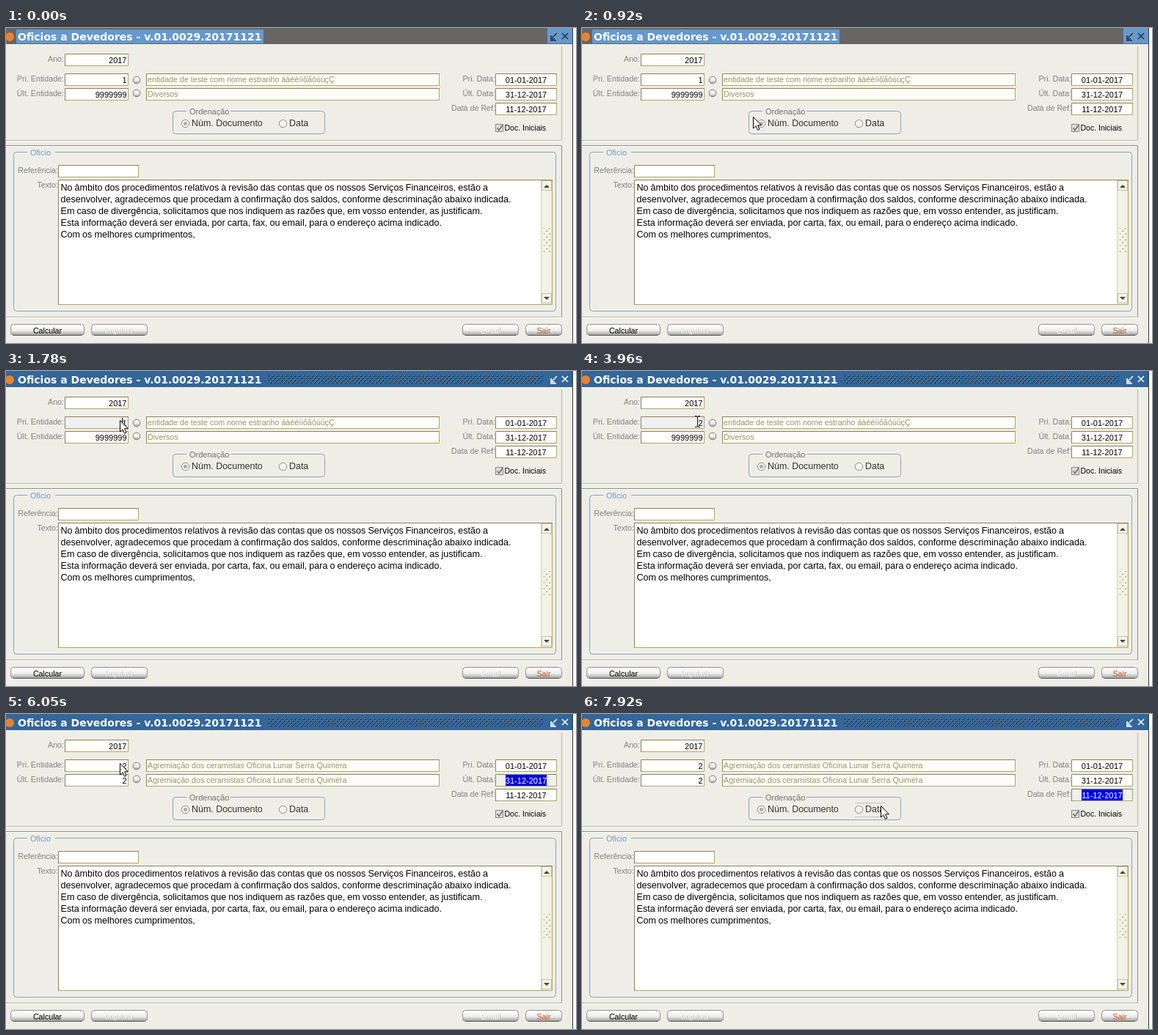
An HTML page for the animation above (8000 ms loop, 777x430 px).

```html
<!DOCTYPE html>
<html lang="pt">
<head>
<meta charset="utf-8">
<style>
html, body { margin: 0; width: 100%; height: 100%; overflow: hidden; background: #efeee6; }
svg { display: block; width: 777px; height: 430px; }
text { font-family: "Liberation Sans", Arial, sans-serif; font-size: 10.7px; white-space: pre; }
.title { font: bold 14px "DejaVu Sans", Verdana, sans-serif; fill: #fff; }
.label { fill: #808080; text-anchor: end; }
.num { font-size: 11px; text-anchor: end; }
.date { font-size: 11px; text-anchor: middle; }
.name { fill: #9a9660; }
.body { font-size: 12.6px; word-spacing: -.5px; }
.option { font-size: 12.45px; fill: #333; }
.button { text-anchor: middle; }
</style>
</head>
<body>
<svg id="stage" viewBox="0 0 777 430" xmlns="http://www.w3.org/2000/svg"></svg>
<script>
const LOOP = 8000;
const stage = document.getElementById('stage');

const rect = (x, y, w, h, fill, extra = '') =>
  `<rect x="${x}" y="${y}" width="${w}" height="${h}" fill="${fill}" ${extra}/>`;
const path = (d, stroke, extra = '') => `<path d="${d}" fill="none" stroke="${stroke}" ${extra}/>`;
const text = (x, y, cls, value, extra = '') => `<text x="${x}" y="${y}" class="${cls}" ${extra}>${value}</text>`;
const circle = (x, y, r, fill, extra = '') => `<circle cx="${x}" cy="${y}" r="${r}" fill="${fill}" ${extra}/>`;

// Sunken box: dark top and left edges, olive bottom and right edges
const box = (id, x, y, w, h, fill = '#fff') =>
  rect(x, y, w, h, fill, `id="${id}"`) +
  path(`M${x + .5} ${y + h}V${y + .5}H${x + w}`, '#85845c') +
  path(`M${x + 1} ${y + h - .5}H${x + w - .5}V${y + 1}`, '#a9a869');

const group = (x, y, w, h, label, labelX, gap, color) =>
  rect(x + .5, y + .5, w, h, 'none', 'rx="4" stroke="#8aa4bd"') +
  rect(labelX - 4, y - 1, gap, 3, '#efeee6') +
  text(labelX, y + 5, '', label, `fill="${color}" style="font-size:11px"`);

const button = (x, w, label, color, disabled) => {
  const mid = x + w / 2;
  return rect(x + .5, 404.5, w - 1, 15, 'url(#gloss)', 'rx="4" stroke="#8f8f8f"') +
    path(`M${x + 4} 419.5H${x + w - 4}`, '#555') +
    (disabled ? text(mid + .6, 417.4, 'button', label, 'fill="#aaa"') : '') +
    text(mid, 416.5, 'button', label, `fill="${color}"`);
};

const radio = (x, y) => circle(x, y, 5.2, '#f4f4ee', 'stroke="#8b8b8b"');
const knob = y => circle(178, y, 4.8, 'url(#gloss)', 'stroke="#777"');
const bumps = (id, size, dark, light) =>
  `<pattern id="${id}" width="${size}" height="${size}" patternUnits="userSpaceOnUse">` +
  [0, size / 2].map(p => rect(p, size / 2 - p, 2, 2, dark) + rect(p, size / 2 - p, 1, 1, light)).join('') + '</pattern>';

const letter = [
  'No âmbito dos procedimentos relativos à revisão das contas que os nossos Serviços Financeiros, estão a',
  'desenvolver, agradecemos que procedam à confirmação dos saldos, conforme descriminação abaixo indicada.',
  'Em caso de divergência, solicitamos que nos indiquem as razões que, em vosso entender, as justificam.',
  'Esta informação deverá ser enviada, por carta, fax, ou email, para o endereço acima indicado.',
  'Com os melhores cumprimentos,'
];

const defs = `<defs>
  <linearGradient id="gloss" x2="0" y2="1">
    <stop offset="0" stop-color="#fff"/><stop offset=".55" stop-color="#efefed"/><stop offset="1" stop-color="#9c9c9c"/>
  </linearGradient>
  ${bumps('titleBumps', 6, '#252b30', '#9aa3aa')}${bumps('thumbBumps', 8, '#a3a28c', '#fff')}
</defs>`;

const titleBar = rect(0, 0, 772, 22, '#666', 'id="bar"') +
  `<g id="patches">${rect(14, 2, 337, 19, '#69c')}${rect(738, 0, 34, 21, '#69c')}</g>` +
  rect(358, 6, 374, 12, 'url(#titleBumps)', 'id="grip"') +
  circle(5, 12, 6, '#e8822e') +
  text(16, 17, 'title', 'Oficios a Devedores - v.01.0029.20171121') +
  `<g id="controls" fill="none" stroke-width="1.5">
    <path d="M751 7L743 15M743 10V15H748M742 17H750"/><path d="M758 7L766 15M766 7L758 15"/></g>`;

const panels = path('M757.5 25V153.5H0', '#b5b4ac') +
  path('M757.5 394.5V160.5H0', '#8c8c88') +
  path('M0 154.5H758M0 161.5H757', '#fff') + path('M0 394.5H758', '#b5b4ac') +
  path('M0 395.5H758', '#fff') +
  path('M772.5 0V430', '#333') + rect(773, 0, 4, 430, '#fff');

const labels = [
  [79, 46, 'Ano:'], [79, 73, 'Pri. Entidade:'], [79, 93, 'Últ. Entidade:'],
  [667, 73, 'Pri. Data:'], [667, 93, 'Últ. Data:'], [667, 113, 'Data de Ref:'],
  [71, 198, 'Referência:'], [71, 218, 'Texto:']
].map(([x, y, value]) => text(x, y, 'label', value)).join('');

const numberField = (id, y, value) => box(id, 80, y, 87, 17) +
  rect(122, y + 1, 43, 15, '#0000e6', `id="${id}Mark"`) + text(164.5, y + 13, 'num', value, `id="${id}Text"`);
const dateField = (id, y, value) => box(id, 667, y, 84, 17) +
  rect(681, y + 1, 56, 15, '#0000e6', `id="${id}Mark"`) + text(709, y + 13, 'date', value, `id="${id}Text"`);
const nameField = (id, y) => box(id, 191, y, 400, 17, '#fcfcfa') + text(193, y + 12, 'name', '', `id="${id}Text"`);

const fields = numberField('year', 35, '2017') + numberField('first', 62, '1') + numberField('last', 82, '9999999') +
  nameField('firstName', 62) + nameField('lastName', 82) + knob(71) + knob(89) +
  dateField('from', 62, '01-01-2017') + dateField('to', 82, '31-12-2017') + dateField('ref', 102, '11-12-2017') +
  rect(667.5, 131.5, 10, 10, '#dededa', 'stroke="#888"') +
  path('M669.5 136.5L672 139.5L677 132.5', '#777', 'stroke-width="1.8"') +
  text(679.5, 140, '', 'Doc. Iniciais', 'style="font-size:10.5px"');

const order = group(227, 113, 207, 31, 'Ordenação', 250, 60, '#707070') +
  radio(244.5, 130.5) + circle(244.5, 130.5, 2.5, '#aaa') + text(253, 134, 'option', 'Núm. Documento') +
  radio(377.5, 130.5) + text(386, 134, 'option', 'Data') +
  path('M372 121.5H413M372 140.5H413', '#c2c1b8', 'id="hover"');

const arrowButton = (y, d) => rect(730.5, y + .5, 13, 13, '#f4f3e6', 'stroke="#c5c4a8"') +
  `<path d="${d}" fill="#444"/>`;
const office = group(10, 169, 739, 217, 'Oficio', 33, 38, '#6f9cc8') +
  box('reference', 71, 187, 110, 17) + box('message', 71, 207, 674, 171) +
  letter.map((line, i) => text(74.5, 222 + 16 * i, 'body', line)).join('') +
  rect(729, 208, 15, 169, '#f3f2e4') + path('M729.5 208V377', '#d3d2b8') +
  arrowButton(208, 'M733 218H741L737 214Z') + arrowButton(362, 'M733 367H741L737 371Z') +
  rect(733, 273, 9, 34, 'url(#thumbBumps)');

const buttons = button(6, 101, 'Calcular', '#000') + button(116, 77, 'Imprimir', '#fff', true) +
  button(622, 77, 'Email', '#fff', true) + button(708, 50, 'Sair', '#d04a10');

const cursors = `<path id="caret" stroke="#000"/>
  <g id="arrow"><path d="M.5 .5V16L4 12.7L6.5 18.3L9 17.2L6.6 11.8H11.5Z" fill="#fff" stroke="#000"/></g>
  <g id="beam"><path d="M-3 -7.5H-1L0.5 -6.5L2 -7.5H4M.5 -6.5V6.5M-3 7.5H-1L.5 6.5L2 7.5H4" fill="none" stroke="#000"/></g>
  <g id="busy">${circle(0, 0, 7, '#e8f5ff', 'stroke="#1687dc" stroke-width="4.5"')}
    ${path('M-7 0A7 7 0 0 1 -2 -6.7', '#7cc6f5', 'stroke-width="3"')}</g>`;

stage.innerHTML = defs + panels + titleBar + labels + fields + order + office + buttons + cursors;

const el = id => document.getElementById(id);
const show = (id, on) => { el(id).style.display = on ? '' : 'none'; };
const setText = (id, value) => { if (el(id).textContent !== value) el(id).textContent = value; };

const oldName = 'entidade de teste com nome estranho áàéèíìõãôúùçÇ';
const newName = 'Agremiação dos ceramistas Oficina Lunar Serra Quimera';

// Each entry applies from its time until the next one
const pointer = [
  [0, ''], [550, 'arrow', 600, 381], [620, 'beam', 545, 335], [700, 'beam', 455, 268],
  [770, 'beam', 370, 212], [850, 'arrow', 290, 160], [920, 'arrow', 233, 121],
  [1010, 'arrow', 205, 102], [1090, 'arrow', 185, 86], [1160, 'arrow', 174, 77],
  [1240, 'arrow', 167, 72], [1330, 'beam', 163, 69], [1390, 'beam', 161, 69],
  [1460, 'beam', 159, 69], [1540, 'beam', 157, 69], [1700, 'arrow', 155, 67],
  [1850, 'beam', 157, 69], [4270, 'arrow', 155, 67], [4970, 'busy', 155, 67],
  [5030, 'beam', 157, 69], [6050, 'arrow', 155, 67], [7610, 'arrow', 178, 72],
  [7690, 'arrow', 240, 86], [7770, 'arrow', 312, 103], [7850, 'arrow', 375, 118],
  [7920, 'arrow', 407, 125]
];
const focus = [[0, ''], [1700, 'first'], [4340, 'from'], [4970, 'last'], [6050, 'to'], [7380, 'ref']];
const caret = [[0, 0], [1780, 158.5], [2320, 0], [2950, 164.5], [3960, 0]];
const firstValue = [[0, '1'], [2950, ''], [3330, '2']];
const lastValue = [[0, '9999999'], [5750, '2']];
const at = (list, t) => list.findLast(([start]) => start <= t);

function draw(now) {
  const t = now % LOOP;
  const active = t >= 1700;
  el('bar').setAttribute('fill', active ? '#369' : '#666');
  el('controls').setAttribute('stroke', active ? '#fff' : '#234');
  show('patches', !active);
  show('grip', active);

  const focused = at(focus, t)[1];
  for (const id of ['first', 'last', 'from', 'to', 'ref', 'year']) {
    const marked = id === focused && id !== 'first' && !(id === 'last' && t >= 5750);
    show(id + 'Mark', marked);
    el(id + 'Text').setAttribute('fill', marked ? '#fff' : '#000');
    el(id).setAttribute('fill', id === focused ? '#f0f0f0' : '#fff');
  }
  setText('firstText', at(firstValue, t)[1]);
  setText('lastText', at(lastValue, t)[1]);
  setText('firstNameText', t < 4340 ? oldName : newName);
  setText('lastNameText', t < 6050 ? 'Diversos' : newName);

  const caretX = at(caret, t)[1];
  show('caret', caretX);
  el('caret').setAttribute('d', `M${caretX} 64V76`);

  const [, kind, x, y] = at(pointer, t);
  for (const id of ['arrow', 'beam', 'busy']) show(id, id === kind);
  if (kind) el(kind).setAttribute('transform', `translate(${x} ${y})`);
  show('hover', t >= 7850);
}

const began = performance.now();
function tick() {
  draw(performance.now() - began);
  requestAnimationFrame(tick);
}
tick();
</script>
</body>
</html>
```
